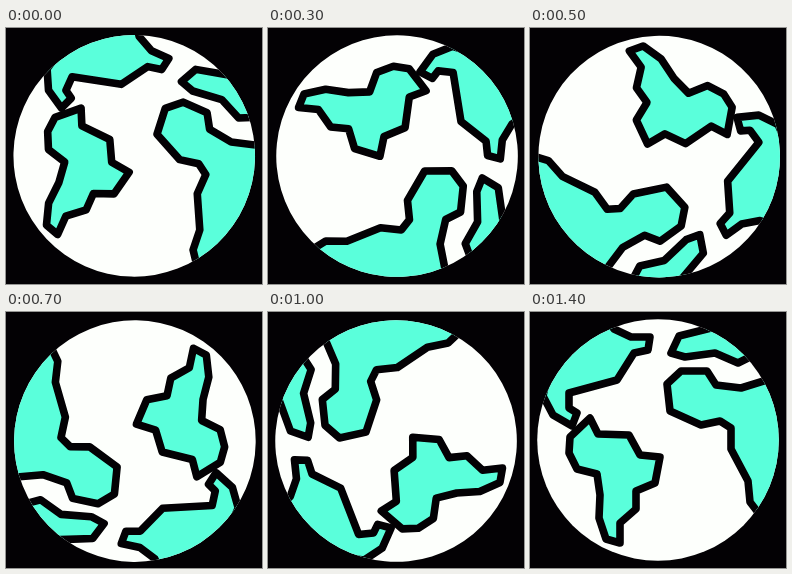
These frames come from a looping animation (256x256 px, 2.4 s). An HTML page with a canvas:

```html
<!DOCTYPE html>
<html lang="en">
<head>
<meta charset="utf-8">
<title>Spinning globe</title>
<style>
  html, body { margin: 0; width: 100%; height: 100%; overflow: hidden; background: #030104; }
  canvas { display: block; width: 256px; height: 256px; }
</style>
</head>
<body>
<canvas id="stage" width="256" height="256"></canvas>
<script>
const ctx = document.getElementById('stage').getContext('2d');

const SIZE = 256, CENTER = 128, PIVOT = 128.5, RADIUS = 120.8;
const LOOP = 2400, STEP = 100, STEPS = 15;
const INK = '#030104', SEA = '#fdfffc', LAND = '#5affdb';

// Coast corners in the upright pose; the first point of a cut-off land lies off the disc.
const northAmerica = new Path2D(
  'M40-40 84 17 101 25 120 25 118 38 104 41 87 68 39 81 39 96 47 101 42 114 23 103 13 84Z');
const southAmerica = new Path2D(
  'M60 106 68 122 99 123 110 143 130 145 125 171 106 179 106 197 90 211 90 231 76 227 69 206 70 183 67 162 47 157 39 141 40 125Z');
const europe = new Path2D(
  'M240 0 181 16 149 24 141 41 155 45 185 41 208 51 220 45Z');
const africa = new Path2D(
  'M290 128 250 64 211 76 186 73 177 59 151 59 137 72 140 99 171 113 190 109 201 116 201 137 218 169 220 190 240 216Z');
const lands = [northAmerica, southAmerica, europe, africa];

function draw(angle) {
  ctx.fillStyle = INK;
  ctx.fillRect(0, 0, SIZE, SIZE);
  ctx.save();
  ctx.translate(PIVOT, PIVOT);
  ctx.rotate(angle);
  ctx.translate(-PIVOT, -PIVOT);

  ctx.beginPath();
  ctx.arc(CENTER, CENTER, RADIUS, 0, Math.PI * 2);
  ctx.fillStyle = SEA;
  ctx.fill();
  ctx.clip();

  ctx.fillStyle = LAND;
  ctx.strokeStyle = INK;
  ctx.lineWidth = 7.6;
  ctx.lineJoin = 'round';
  for (const land of lands) {
    ctx.fill(land);
    ctx.stroke(land);
  }
  ctx.restore();
}

const start = performance.now();

// One full turn in equal steps, then a rest in the upright pose.
function tick() {
  const time = (performance.now() - start) % LOOP;
  const step = Math.min(Math.floor(time / STEP) + 1, STEPS);
  draw(step / STEPS * Math.PI * 2);
  requestAnimationFrame(tick);
}
tick();
</script>
</body>
</html>
```
